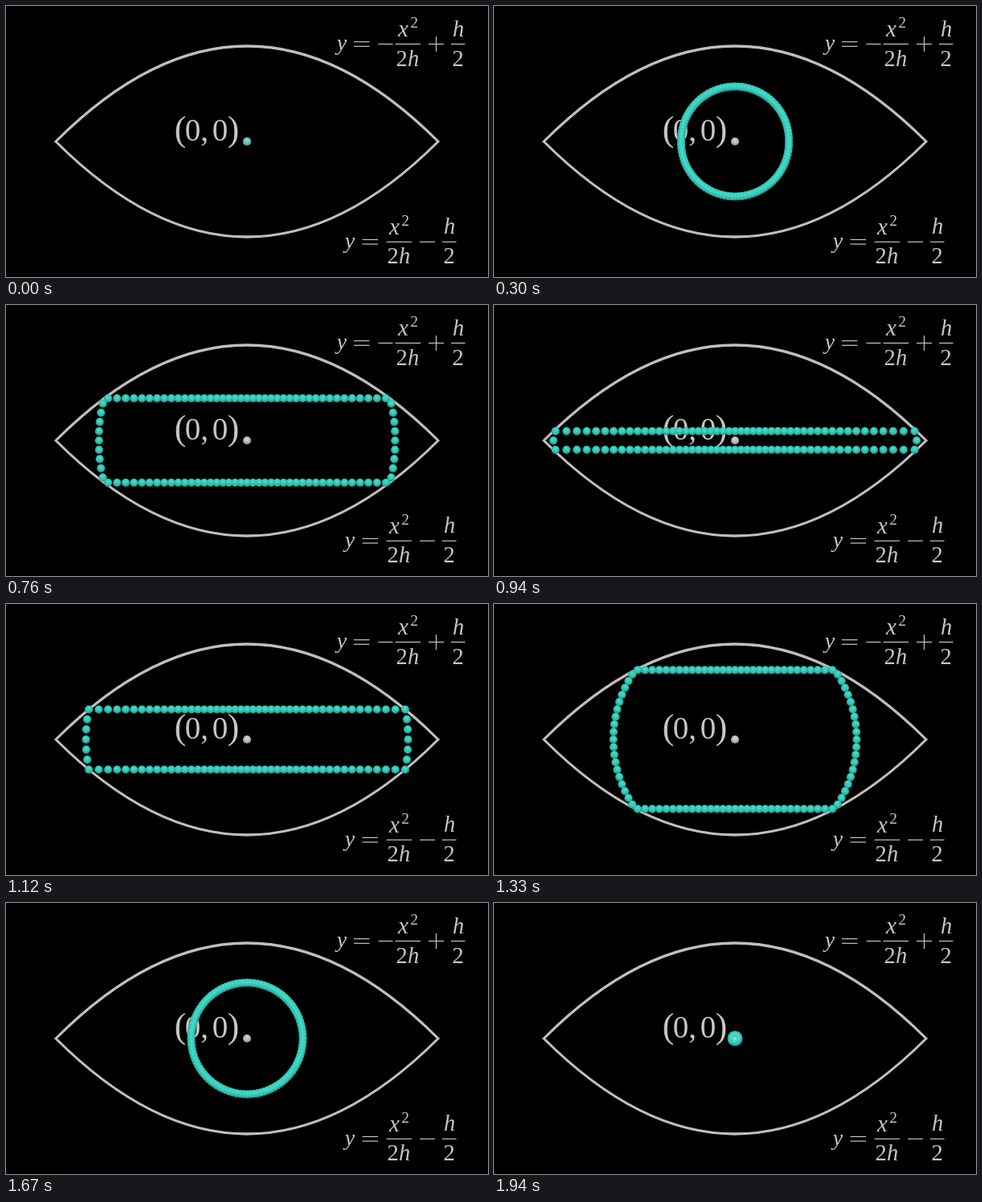
An HTML page with a canvas for the animation above (1.97 s loop, 600x338 px).

```html
<!DOCTYPE html>
<html lang="en">
<head>
<meta charset="utf-8">
<title>Wave between two parabolas</title>
<style>
  html, body { margin: 0; width: 100%; height: 100%; overflow: hidden; background: #000; }
  canvas { display: block; width: 600px; height: 338px; }
</style>
</head>
<body>
<canvas id="stage"></canvas>
<script>
const W = 600, H = 338, CX = 300, CY = 169;
const FOCAL = 238;            // the "h" of both parabolas, in pixels
const COUNT = 100, RADIUS = 5.1;
const LOOP = 1970, SLOT = 30;
const STEP = 8.185, OFFSET = 2.8, LAG = 5.35;
const INK = "#c6c6c6", LINE = "#bfbfbf";
const SERIF = '"Liberation Serif", "Times New Roman", serif';
const scale = window.devicePixelRatio || 1;

function setup(canvas) {
  canvas.width = Math.round(W * scale);
  canvas.height = Math.round(H * scale);
  const g = canvas.getContext("2d");
  g.scale(scale, scale);
  return g;
}

const stage = document.getElementById("stage");
const ctx = setup(stage);
const back = document.createElement("canvas");
const backCtx = setup(back);
const layer = document.createElement("canvas");
const dots = setup(layer);

function shade(g, colors) {
  const fill = g.createRadialGradient(0, -1.8, 0, 0, -0.6, 6);
  colors.forEach((c, i) => fill.addColorStop(i / (colors.length - 1), c));
  return fill;
}
const teal = shade(dots, ["#4fdccb", "#36cab8", "#1c9687"]);
const white = shade(ctx, ["#d6d6d6", "#bdbdbd", "#858585"]);

function ball(g, x, y, r, fill) {
  g.save();
  g.translate(x, y);
  g.fillStyle = fill;
  g.beginPath();
  g.arc(0, 0, r, 0, Math.PI * 2);
  g.fill();
  g.restore();
}

function glyph(g, s, x, y, size, italic) {
  g.font = (italic ? "italic " : "") + size + "px " + SERIF;
  g.fillText(s, x, y);
}

function bar(g, x1, x2, y) {
  g.fillRect(x1, y - 0.6, x2 - x1, 1.2);
}

// Everything both formulas share, shifted as a block
function formula(g, dx, dy, yx, eqx, plus) {
  glyph(g, "y", yx, 55 + dy, 28, true);
  bar(g, eqx, eqx + 19.5, 44.7 + dy);
  bar(g, eqx, eqx + 19.5, 50.3 + dy);

  bar(g, 484.5 + dx, 516 + dx, 47.5 + dy);
  glyph(g, "x", 494.5 + dx, 38 + dy, 29, true);
  glyph(g, "2", 508 + dx, 27 + dy, 19.5);
  glyph(g, "2", 492.5 + dx, 74.5 + dy, 28.5);
  glyph(g, "h", 507 + dx, 74.5 + dy, 28.5, true);

  bar(g, 554 + dx, 571.5 + dx, 47.5 + dy);
  glyph(g, "h", 563 + dx, 37.5 + dy, 28.5, true);
  glyph(g, "2", 562.7 + dx, 74.5 + dy, 28.5);

  bar(g, 526 + dx, 545 + dx, 47.5 + dy);
  if (plus) g.fillRect(534.9 + dx, 38 + dy, 1.2, 19);
}

function drawBack(g) {
  g.fillStyle = "#000";
  g.fillRect(0, 0, W, H);

  g.strokeStyle = LINE;
  g.lineWidth = 3.1;
  g.lineJoin = "miter";
  g.beginPath();
  g.moveTo(CX - FOCAL, CY);
  g.quadraticCurveTo(CX, CY - FOCAL, CX + FOCAL, CY);
  g.quadraticCurveTo(CX, CY + FOCAL, CX - FOCAL, CY);
  g.closePath();
  g.stroke();

  g.fillStyle = INK;
  g.textAlign = "center";
  glyph(g, "(", 217, 168.3, 43.5);
  glyph(g, "0", 232.5, 168, 39);
  glyph(g, ",", 247, 168, 39);
  glyph(g, "0", 266.5, 168, 39);
  glyph(g, ")", 283, 168.3, 43.5);

  formula(g, 0, 0, 418, 433, true);
  bar(g, 463.5, 481.5, 47.5);
  formula(g, -11, 246.7, 428, 443.5, false);
}

// Distance the wave has travelled, advancing in video steps
function travel(t) {
  const n = Math.floor((t - 10 * Math.round(t / 1000)) / SLOT + 1e-4);
  const k = n - Math.floor((n + 6) / 11);
  return Math.max(0, STEP * k - OFFSET);
}

// Straight out from the focus, then vertical after the bounce.
// With a lag the first leg starts late but still meets the wall on time.
function place(angle, s, lag) {
  const sin = Math.sin(angle), cos = Math.cos(angle);
  const wall = FOCAL / (1 + Math.abs(sin));
  if (s <= wall) {
    const r = wall * Math.max(0, s - lag) / (wall - lag);
    return [CX + r * cos, CY - r * sin];
  }
  return [CX + wall * cos, CY - Math.sign(sin) * (FOCAL - s)];
}

function draw(t) {
  const d = travel(t);
  const outward = d < FOCAL;
  const lag = outward ? LAG : 0;
  const s = outward ? d : 2 * FOCAL - d;
  const ring = Math.max(0, s - lag);

  ctx.drawImage(back, 0, 0, W, H);
  ball(ctx, CX, CY, RADIUS, white);

  dots.clearRect(0, 0, W, H);
  dots.globalCompositeOperation = "lighten";
  const total = ring === 0 ? 1 : COUNT;
  for (let i = 0; i < total; i++) {
    const [x, y] = place(i * 2 * Math.PI / COUNT, s, lag);
    ball(dots, x, y, RADIUS, teal);
  }
  ctx.drawImage(layer, 0, 0, W, H);

  // The centre sphere shows through the ring while they intersect
  if (ring === 0) {
    ctx.globalAlpha = 0.45;
    ball(ctx, CX, CY, RADIUS, white);
    ctx.globalAlpha = 1;
  } else if (ring < 2 * RADIUS) {
    ball(ctx, CX, CY, ring / 2, white);
  }
}

drawBack(backCtx);
const start = performance.now();
function tick() {
  draw((performance.now() - start) % LOOP);
  requestAnimationFrame(tick);
}
tick();
</script>
</body>
</html>
```
